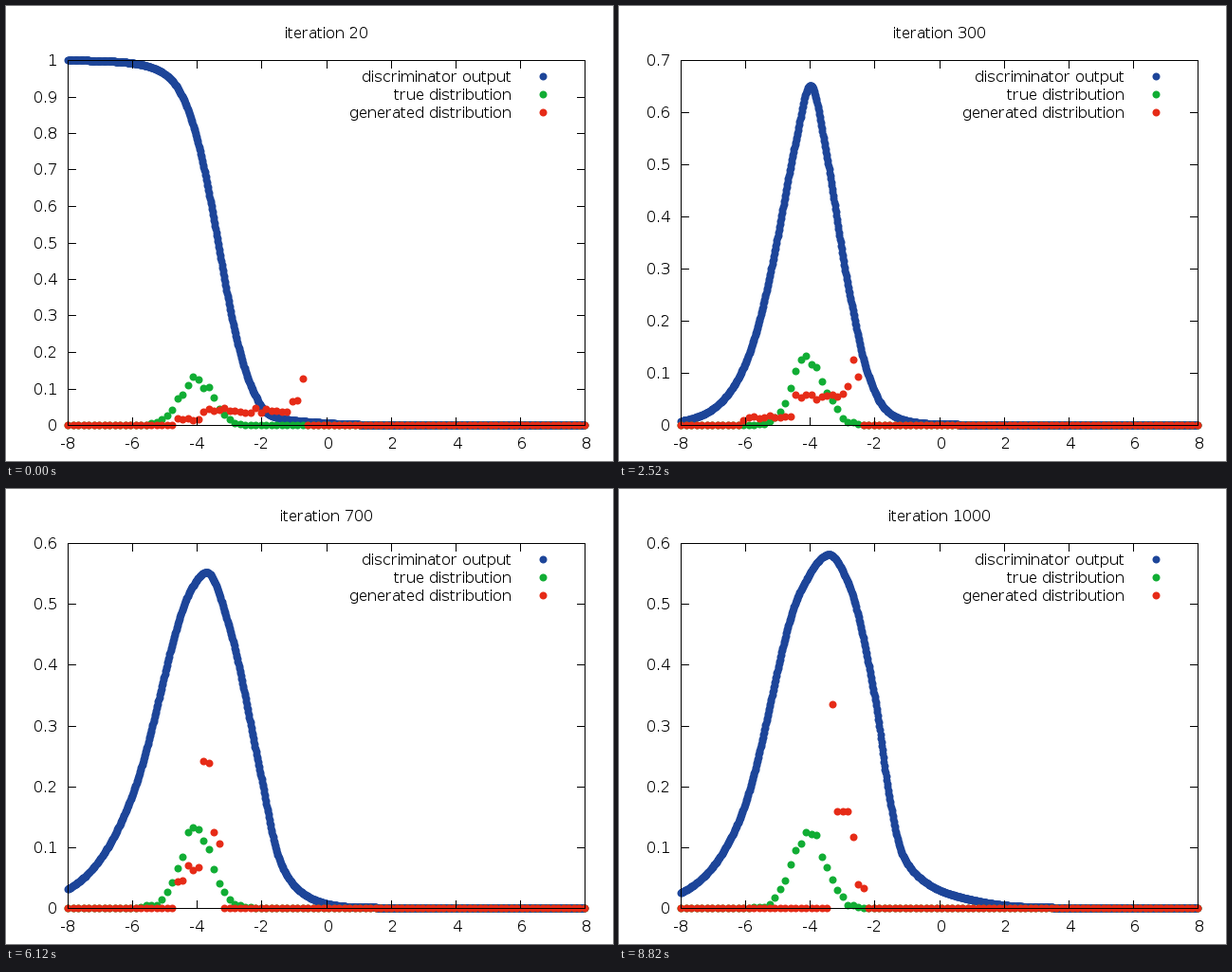
Write a matplotlib script that moves like this. It is 640 px wide and 480 px high and loops after 9 s.

```python
import math

import matplotlib.pyplot as plt
import numpy as np
from matplotlib.animation import FuncAnimation

W, H, DPI = 640, 480, 64
PX = 72 / DPI
RIGHT, TOP, BOTTOM, TICK = 610, 57, 442, 8
FRAMES, STEP_MS = 50, 180
BINS, DRAWS = 100, 3000
BLUE, GREEN, RED = "#1D4599", "#11AD34", "#E62B17"

# Whole-pixel hinting keeps letter advances on the pixel grid.
plt.rcParams.update({"font.family": "DejaVu Sans", "font.size": 16 * PX,
                     "text.hinting": "no_autohint", "text.hinting_factor": 1})

grid = np.linspace(-8, 8, 1000)
bin_x = np.linspace(-8, 8, BINS)
edges = np.arange(BINS + 1)
levels = (np.arange(4000) + 0.5) / 4000

bell = np.exp(-2 * (-4 + 0.16 * (np.arange(BINS) + 0.5)) ** 2)
bell /= bell.sum()


def smooth(x, y, at):
    """Monotone cubic through the points."""
    h, s = np.diff(x), np.diff(y) / np.diff(x)
    m = np.r_[s[0], np.zeros(len(x) - 2), s[-1]]
    same = s[:-1] * s[1:] > 0
    a, b = s[:-1][same], s[1:][same]
    m[1:-1][same] = 2 * a * b / (a + b)
    k = np.clip(np.searchsorted(x, at, side="right") - 1, 0, len(h) - 1)
    t = (at - x[k]) / h[k]
    return ((1 + 2 * t) * (1 - t) ** 2 * y[k] + t * (1 - t) ** 2 * h[k] * m[k]
            + t * t * (3 - 2 * t) * y[k + 1] + t * t * (t - 1) * h[k] * m[k + 1])


states = {}


def state(iteration, curve, shares):
    """Key points of the discriminator and of the generator's cumulative share."""
    x, p = np.array(curve + [(8, 1e-5)]).T
    bins, total = np.array(shares).T
    states[iteration // 20 - 1] = (smooth(x, np.log(p / (1 - p)), grid),
                                   np.interp(levels, total, bins))


state(20,
      [(-8, .9995), (-5, .962), (-4, .785), (-3.02, .34), (-2.23, .088),
       (-1.7, .026), (.06, .005), (1.8, .0005)],
      [(21, 0), (26, .077), (43, .75), (45, .88), (46, 1)])
state(180,
      [(-8, .0005), (-6.02, .033), (-5.08, .233), (-4.43, .582), (-3.99, .76),
       (-3.52, .542), (-2.79, .12), (-2.23, .029), (-.53, .002)],
      [(0, 0), (18, .147), (38, .725), (39, .765), (41, .887), (42, 1)])
state(420,
      [(-8, .1), (-6.11, .32), (-4.43, .51), (-3.82, .526), (-2.7, .46),
       (-2.17, .28), (-1.7, .098), (-1.03, .021), (.2, .0015)],
      [(25, 0), (26, .115), (27, 1)])
state(580,
      [(-8, .252), (-6.01, .362), (-4.46, .448), (-4.25, .452), (-3.68, .417),
       (-2.78, .261), (-2.15, .121), (-1.68, .047), (-.84, .009), (.66, .0008)],
      [(4, 0), (5, .016), (22, .865), (24, 1)])
state(700,
      [(-8, .031), (-6.05, .179), (-4.17, .525), (-3.7, .552), (-2.99, .46),
       (-2, .213), (-1.41, .075), (-.23, .011), (1.09, .0012)],
      [(21, 0), (23, .09), (26, .293), (28, .766), (30, 1)])
state(840,
      [(-8, .422), (-6.52, .466), (-4.37, .497), (-3.08, .483), (-2.3, .448),
       (-1.86, .366), (-1.47, .223), (-.99, .138), (.66, .026), (2, .0065),
       (4.1, .0006)],
      [(21, 0), (22, .05), (25, .717), (27, 1)])
state(1000,
      [(-8, .025), (-6.25, .137), (-4.31, .519), (-3.4, .581), (-2.82, .535),
       (-1.97, .34), (-1.53, .179), (-1.115, .086), (-.23, .036), (1.23, .011),
       (3.29, .001)],
      [(29, 0), (30, .322), (33, .793), (34, .922), (36, 1)])

stops = sorted(states)


def sample(i):
    """Discriminator, true and generated values at step i."""
    k = min(np.searchsorted(stops, i, side="right") - 1, len(stops) - 2)
    lo, hi = stops[k], stops[k + 1]
    t = (i - lo) / (hi - lo)
    logit, place = ((1 - t) * a + t * b for a, b in zip(states[lo], states[hi]))
    share = np.histogram(place, edges)[0] / len(levels)
    rng = np.random.default_rng(i)
    true, gen = (rng.multinomial(DRAWS, p) / DRAWS for p in (bell, share))
    return 1 / (1 + np.exp(-logit)), true, gen


def tick_step(top):
    power = 10.0 ** math.floor(math.log10(top))
    slots = 20 * power / top
    for limit, size in ((40, .05), (20, .1), (10, .2), (4, .5), (2, 1)):
        if slots > limit:
            return size * power
    return 2 * power


fig = plt.figure(figsize=(W / DPI, H / DPI), dpi=DPI, facecolor="white")
ax = fig.add_axes([0, 0, 1, 1])
ax.set_xlim(0, W)
ax.set_ylim(H, 0)
ax.axis("off")


def label(x, y, text="", ha="center"):
    return ax.text(x, y, text, ha=ha, va="baseline", color="black")


series = []
for row, (name, color) in enumerate((("discriminator output", BLUE),
                                     ("true distribution", GREEN),
                                     ("generated distribution", RED))):
    label(533, 80 + 19 * row, name, "right")
    series.append(ax.plot([], [], ls="", marker="o", ms=8 * PX, mew=0,
                          color=color, zorder=2 + row)[0])

frame = ax.plot([], [], color="black", lw=PX, snap=True, zorder=6,
                solid_capstyle="projecting", solid_joinstyle="miter")[0]
title = label(338, 34)
x_labels = [label(0, 467, str(v)) for v in range(-8, 9, 2)]
y_labels = [label(0, 0, ha="right") for _ in range(12)]


def draw(i):
    values = sample(i)
    top = max(v.max() for v in values)
    step = tick_step(top)
    count = math.ceil(top / step - 1e-9)
    left = 65 if step > 0.09 else 75
    width, height = RIGHT - left, BOTTOM - TOP

    for row, (line, v) in enumerate(zip(series, values)):
        xs = grid if row == 0 else bin_x
        px = left + (xs + 8) / 16 * width
        py = BOTTOM - v / (count * step) * height
        line.set_data(np.r_[px, 566], np.r_[py, 74 + 19 * row])

    paths = [[(left, TOP), (RIGHT, TOP), (RIGHT, BOTTOM), (left, BOTTOM), (left, TOP)]]
    for k, text in enumerate(x_labels):
        x = left + k * width / 8
        paths += [[(x, BOTTOM), (x, BOTTOM - TICK)], [(x, TOP), (x, TOP + TICK)]]
        text.set_x(x - 0.5 if k < 4 else x + 2)
    for k, text in enumerate(y_labels):
        text.set_visible(k <= count)
        if k <= count:
            y = round(BOTTOM - k * height / count)
            paths += [[(left, y), (left + TICK, y)], [(RIGHT, y), (RIGHT - TICK, y)]]
            text.set_position((left - 11, y + 6))
            text.set_text(f"{k * step:g}")
    gap = [(np.nan, np.nan)]
    frame.set_data(*np.array([p for path in paths for p in path + gap]).T)

    title.set_text(f"iteration {20 * (i + 1)}")
    title.set_x((left + RIGHT) / 2 + 0.5)
    return [*series, frame, title, *x_labels, *y_labels]


anim = FuncAnimation(fig, draw, frames=FRAMES, init_func=lambda: draw(0),
                     interval=STEP_MS, repeat=True, repeat_delay=0, blit=False)
plt.show()
```
